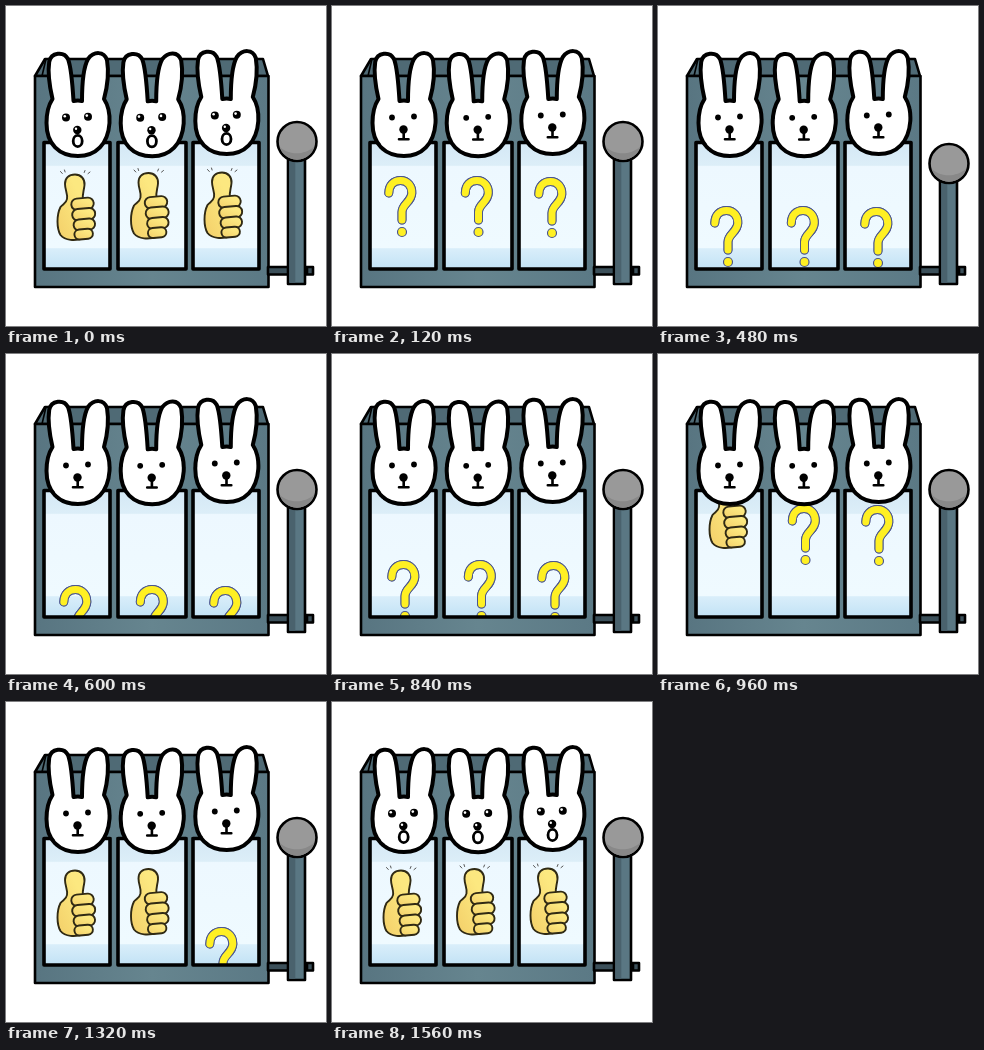
Animation, 320 px wide and 320 px high, one loop 2040 ms. Source, as an HTML page:

```html
<!DOCTYPE html>
<html lang="en">
<head>
<meta charset="utf-8">
<title>Bunny slot machine</title>
<style>
html, body { margin: 0; width: 100%; height: 100%; overflow: hidden; background: #fff; }
svg { display: block; width: 100vw; height: 100vh; }
</style>
</head>
<body>
<svg viewBox="0 0 320 320" stroke-linecap="round" stroke-linejoin="round">
  <defs>
    <linearGradient id="glass" x1="0" y1="0" x2="0" y2="1">
      <stop offset="0" stop-color="#d4e8f5"/>
      <stop offset=".18" stop-color="#dceef8"/>
      <stop offset=".19" stop-color="#edf8ff"/>
      <stop offset=".83" stop-color="#effaff"/>
      <stop offset=".84" stop-color="#d9eefa"/>
      <stop offset="1" stop-color="#c2e2f5"/>
    </linearGradient>
    <linearGradient id="steel" x1="0" y1="0" x2="1" y2="0">
      <stop offset="0" stop-color="#587581"/>
      <stop offset=".5" stop-color="#66858f"/>
      <stop offset="1" stop-color="#5b7985"/>
    </linearGradient>
    <linearGradient id="skin" x1="1" y1="0" x2="0" y2="1">
      <stop offset=".3" stop-color="#fce880"/>
      <stop offset="1" stop-color="#f3cf69"/>
    </linearGradient>
    <g id="ask" fill="none">
      <path id="hook" d="M56.800 187C57 179 62 174.500 68.500 174.500C75.500 174.500 80 180 79.800 187C79.500 196 70 198 70 206V214" stroke="#4b568f" stroke-width="9"/>
      <use href="#hook" style="stroke:#fff023"/>
      <path d="M56.800 187C57 179 62 174.500 68.500 174.500C75.500 174.500 80 180 79.800 187C79.500 196 70 198 70 206V214" stroke="#fff023" stroke-width="7"/>
      <circle cx="70" cy="226" r="4.500" fill="#fff023" stroke="#4b568f" stroke-width="1.200"/>
    </g>
    <g id="thumb" fill="url(#skin)" stroke="#302a14" stroke-width="1.900">
      <path d="M61 193C62 188 59 184 59 178C59 172 63 168.500 69 168.500C75 168.500 79 173 78.500 179C78 185 76 188 77 194L82 206L78 232C69 235.500 59 234.500 54.500 229C50.500 222 50.500 209 54.500 201C57 198 60.500 197 61 193Z"/>
      <g transform="rotate(-5 78 212)">
        <rect x="66.500" y="192" width="22.500" height="11.500" rx="5.700"/>
        <rect x="66.500" y="202.500" width="23" height="11.500" rx="5.700"/>
        <rect x="67" y="213" width="21.500" height="11" rx="5.500"/>
        <rect x="67" y="223" width="18.500" height="10" rx="5"/>
      </g>
    </g>
    <g id="sparks" stroke="#555" stroke-width="1">
      <path d="M54.500 165.500l1.800 2M58.500 164l.6 2M79 164.500l-.8 2M84 166l-2 1.600"/>
    </g>
    <path id="bunny" fill="#fff" stroke="#000" stroke-width="4" d="M46.500 93C43.500 80 42 64 43.200 56C45 46 58 45 62 53C65.500 62 66.500 78 67.500 95Q72 94 76 95C76 78 77 62 82 53C88 45 98 45 101 54C103 66 101 82 98 93C102 99 104 108 103.500 117C102 138 90 150 72 150C53 150 40.500 138 40.500 117C40.500 107 42.500 99 46.500 93Z"/>
    <g id="calm">
      <circle cx="60" cy="111.500" r="2.900"/><circle cx="82" cy="110.500" r="2.900"/>
      <circle cx="71.500" cy="123.500" r="4.200"/>
      <path d="M71.700 125V132.500M67 133.200H76.500" fill="none" stroke="#000" stroke-width="2.600"/>
    </g>
    <g id="wow">
      <circle cx="60" cy="111.500" r="4"/><circle cx="82" cy="110.800" r="4"/>
      <circle cx="71.300" cy="124" r="4.200"/>
      <g fill="#fff">
        <circle cx="58.800" cy="110.300" r="1.300"/><circle cx="80.800" cy="109.600" r="1.300"/>
        <circle cx="70" cy="122.700" r="1.200"/>
      </g>
      <ellipse cx="71.700" cy="135" rx="4.500" ry="5.600" fill="#fff" stroke="#000" stroke-width="2.800"/>
    </g>
  </defs>

  <g fill="url(#steel)" stroke="#000" stroke-width="2.600">
    <path d="M29 70L39 53H257L262 70Z" fill="#4f6a75"/>
    <path d="M29 70H262.500V281H29Z"/>
    <path d="M40 53L36 70" stroke-width="1.600"/>
  </g>
  <g id="reels"></g>
  <g id="heads"></g>

  <g stroke="#000" stroke-width="2.600">
    <path d="M262 261H307V268.500H262ZM301 261V268.500" fill="#3c505a"/>
    <rect id="rod" x="282" width="17" fill="#5a7783"/>
    <rect id="shade" x="283.300" width="6" fill="#4a626d" stroke="none"/>
    <g id="knob">
      <circle cx="291" r="19.500" fill="#999"/>
      <path d="M273.500 5C281 13 297 15 308.500 5A18.200 18.200 0 0 1 273.500 5Z" fill="#888" stroke="none"/>
    </g>
  </g>
</svg>
<script>
const NS = "http://www.w3.org/2000/svg";
const byId = id => document.getElementById(id);

function add(parent, tag, attrs) {
  const el = document.createElementNS(NS, tag);
  for (const k in attrs) el.setAttribute(k, attrs[k]);
  parent.appendChild(el);
  return el;
}
const use = (parent, name, x = 0, y = 0) =>
  add(parent, "use", { href: "#" + name, transform: `translate(${x} ${y})` });
const show = (el, on) => el.setAttribute("display", on ? "inline" : "none");
const move = (el, x, y) => el.setAttribute("transform", `translate(${x} ${y})`);

const STEP = 120, LOOP = 2040, LAST = 13;
const columns = [
  { x: 38, w: 66, ask: [0, 0], thumb: [0, 0], head: [0, 0], stop: 8 },
  { x: 112, w: 68, ask: [76.5, 0], thumb: [73.5, -1.5], head: [74.2, 0.3], stop: 10 },
  { x: 187, w: 66, ask: [150, 1], thumb: [147, -2], head: [148.8, -2], stop: 12 }
];

// Reel offset of the question mark at each step: [dx, dy]
const spin = [[0, 0], [0, 0], [0, 0], [0, 0], [0, 30], [1, 61], [2, -25],
  [3, 36], [1, -20], [0, 29], [-2, -12], [-3, 54]];

const reels = columns.map((c, i) => {
  const g = byId("reels"), heads = byId("heads");
  const box = { x: c.x, y: 136.5, width: c.w, height: 126.5 };
  add(add(g, "clipPath", { id: "clip" + i }), "rect", box);
  add(g, "rect", { ...box, fill: "url(#glass)" });
  const inner = add(g, "g", { "clip-path": `url(#clip${i})` });
  const askEl = use(inner, "ask"), thumbEl = use(inner, "thumb");
  const sparks = use(inner, "sparks", ...c.thumb);
  add(g, "rect", { ...box, fill: "none", stroke: "#000", "stroke-width": 3.6 });
  use(heads, "bunny", ...c.head);
  const calm = use(heads, "calm", ...c.head), wow = use(heads, "wow", ...c.head);
  return { ...c, askEl, thumbEl, sparks, calm, wow };
});

function setLever(y) {
  move(byId("knob"), 0, y);
  for (const [id, inset] of [["rod", 0], ["shade", 1.3]]) {
    byId(id).setAttribute("y", y + 10);
    byId(id).setAttribute("height", 268 - y - inset);
  }
}

function draw(ms) {
  const n = Math.min(LAST, Math.floor((ms % LOOP) / STEP));
  const win = n === 0 || n === LAST;
  for (const r of reels) {
    const done = win || n >= r.stop;
    show(r.askEl, !done);
    show(r.thumbEl, done);
    show(r.sparks, win);
    show(r.wow, win);
    show(r.calm, !win);
    if (done) move(r.thumbEl, r.thumb[0], r.thumb[1] - (n === r.stop ? 40 : 0));
    else move(r.askEl, r.ask[0] + spin[n][0], r.ask[1] + spin[n][1]);
  }
  // Pulled down and released between steps 1 and 5
  setLever(135.5 + 22 * Math.max(0, 2 - Math.abs(n - 3)));
}

const start = performance.now();
function tick() {
  draw(performance.now() - start);
  requestAnimationFrame(tick);
}
draw(0);
requestAnimationFrame(tick);
</script>
</body>
</html>
```
